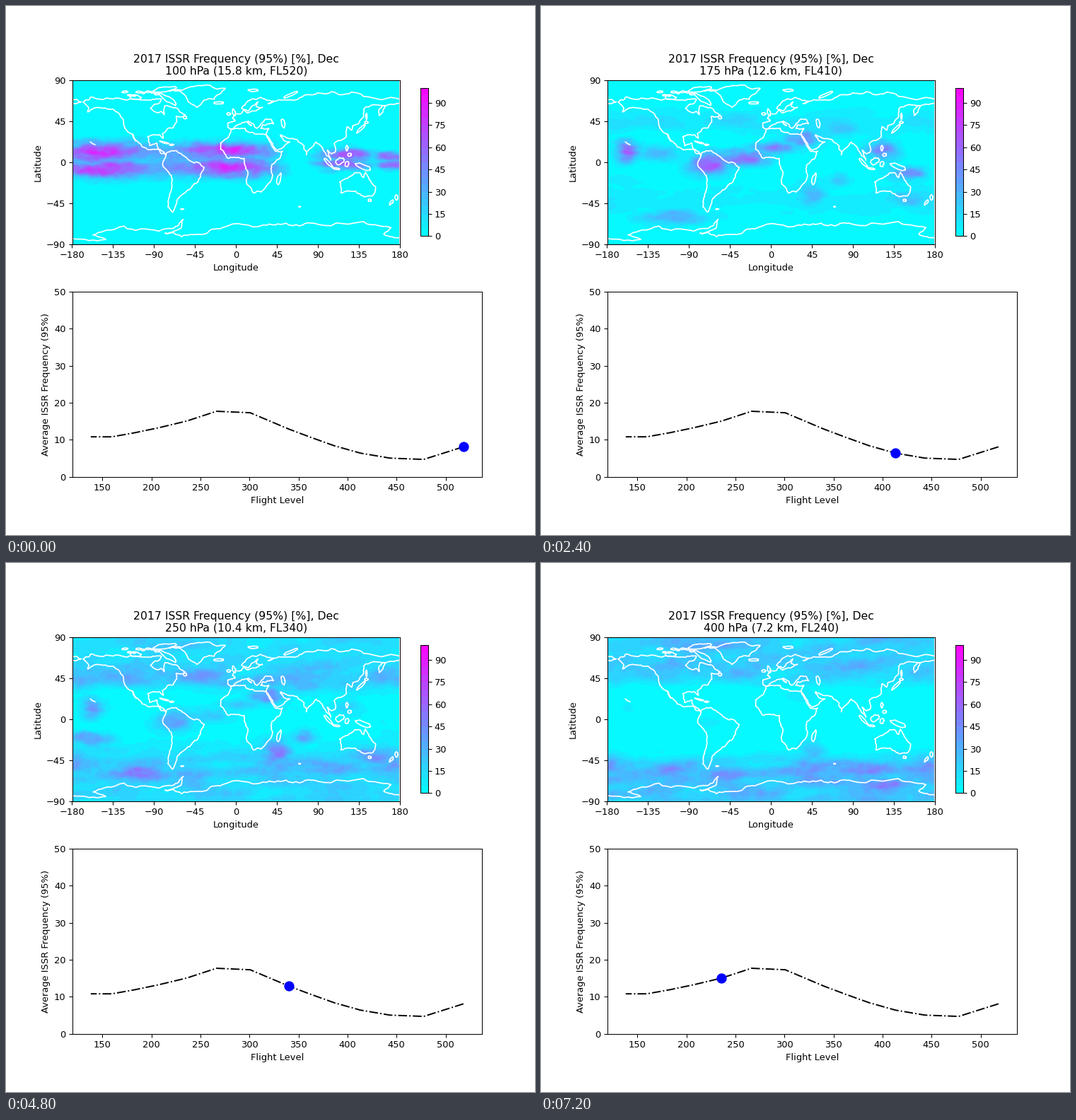
Recreate the animation shown at these times as a matplotlib script. Size 748 by 748 pixels, loop 8000 ms.

```python
import numpy as np
import matplotlib.pyplot as plt
from matplotlib.animation import FuncAnimation

rng = np.random.default_rng(17)
lons, lats = np.arange(-180, 180), np.arange(-90, 91)
LON, LAT = np.meshgrid(lons, lats)


def noise(sx, sy):
    """Smooth random field with unit spread and the given scale in degrees."""
    fx, fy = np.fft.fftfreq(lons.size), np.fft.fftfreq(lats.size)[:, None]
    low = np.exp(-2 * np.pi**2 * ((sx * fx) ** 2 + (sy * fy) ** 2))
    n = np.fft.ifft2(np.fft.fft2(rng.normal(size=LON.shape)) * low).real
    return n / n.std()


def bump(x, center, width, power=2):
    return np.exp(-np.abs((x - center) / width) ** power)


# Noise bends the coordinates so that formulas give ragged clouds.
X = LON + 2 * noise(8, 4) + noise(2.5, 1.5)
Y = LAT + 1.3 * noise(10, 4) + 0.7 * noise(3, 1.5)
TEXTURE = 1 + 0.08 * noise(3, 1.6) + 0.04 * noise(1.3, 0.9)
BROAD = 1 + 0.22 * noise(14, 4)

# Clouds: lon, lat, lon size, lat size, peak, depth of the peak, depth range
CLOUDS = [
    (-68, -2, 22, 11, 68, 0.45, 0.6), (-30, 3, 28, 8, 60, 0.45, 0.45),
    (-160, 12, 11, 10, 58, 0.55, 0.55), (-125, 9, 24, 8, 44, 0.4, 0.25),
    (5, 15, 24, 7, 46, 0.55, 0.4), (38, 26, 20, 8, 48, 0.75, 0.5),
    (76, 36, 20, 9, 42, 0.75, 0.25), (123, 13, 17, 11, 46, 0.5, 0.4),
    (150, -13, 20, 7, 46, 0.5, 0.25), (150, -41, 22, 9, 46, 0.8, 0.3),
    (43, -37, 14, 13, 50, 0.95, 0.5), (73, -20, 15, 8, 42, 0.8, 0.3),
    (-163, -22, 22, 7, 40, 0.95, 0.3), (-108, -61, 38, 8, 52, 0.85, 0.4),
    (-47, -70, 26, 11, 50, 1.1, 0.2), (130, -71, 22, 8, 58, 1.3, 0.2),
    (-78, 80, 30, 5, 50, 1.2, 0.2)]


def tropical_belt():
    """Two ragged bands beside the equator, broken near 68 E and 150 E."""
    half = np.where(X < 60, 9, 5)
    bands = bump(np.abs(Y - 2), half, half * 1.1)
    wave = 54 + 21 * np.cos(np.radians(2.5 * (X + 150)))
    gaps = (1 - bump(X, 68, 24)) * (1 - 0.75 * bump(X, 150, 14))
    return wave * bands * gaps


def humidity(pressure):
    depth = np.log(pressure / 100)
    rise = np.clip((depth - 0.65) / 0.5, 0, 1)
    jets = bump(Y, 44, 11) + 0.6 * bump(Y, -42, 13)
    polar = 21 / (1 + np.exp((42 - np.abs(Y)) / 4)) + 10 * bump(Y, -60, 12)
    base = (15 * jets * bump(depth, 0.85, 0.35) + polar * rise
            + 6 * bump(depth, 0.75, 0.22))
    parts = [base * BROAD, tropical_belt() * bump(depth, 0, 0.3)]
    for lon, lat, sx, sy, peak, level, reach in CLOUDS:
        parts.append(peak * bump(X, lon, sx) * bump(Y, lat, sy)
                     * bump(depth, level, reach))
    total = np.cbrt(sum(np.maximum(p, 0) ** 3 for p in parts))
    return np.clip(total * TEXTURE, 0, 99.9)


fig, (ax, bx) = plt.subplots(2, 1, figsize=(8, 8), dpi=93.5)
levels = np.arange(0, 101, 5)


def fill(pressure):
    return ax.contourf(lons, lats, humidity(pressure), levels, cmap="cool")


fig.colorbar(fill(100), ax=ax, shrink=0.8)
ax.set(xlim=(-180, 180), ylim=(-90, 90), aspect="equal",
       xticks=range(-180, 181, 45), yticks=range(-90, 91, 45),
       xlabel="Longitude", ylabel="Latitude")


def coast(*points):
    """Line through key points, roughened by midpoint displacement."""
    z = np.array([complex(*p) for p in points])
    for _ in range(3):
        step = np.diff(z)
        mid = z[:-1] + step / 2 + 0.09j * step * rng.normal(size=step.size)
        z = np.append(np.column_stack([z[:-1], mid]).ravel(), z[-1])
    ax.plot(z.real, z.imag, color="white", lw=1.3)


def island(lon, lat, rx, ry, tilt=0):
    """Tilted ellipse with an uneven shore."""
    a = np.linspace(0, 2 * np.pi, 13)[:-1]
    z = (rx * np.cos(a) + 1j * ry * np.sin(a)) * rng.uniform(0.75, 1.2, a.size)
    z = lon + 1j * lat + z * np.exp(1j * np.radians(tilt))
    z = np.append(z, z[0])
    ax.plot(z.real, z.imag, color="white", lw=1.3)


# North and South America, Greenland
coast((-77, 8), (-83, 10), (-87, 21), (-95, 18), (-97, 28), (-84, 30),
      (-80, 26), (-81, 31), (-76, 36), (-65, 44), (-66, 50), (-56, 52),
      (-65, 59), (-78, 62), (-79, 52), (-94, 59), (-82, 69), (-95, 68),
      (-128, 70), (-157, 71), (-168, 66), (-162, 60), (-163, 55), (-152, 60),
      (-135, 58), (-124, 47), (-122, 37), (-110, 23), (-114, 31), (-105, 20),
      (-92, 14), (-77, 8))
coast((-77, 8), (-72, 12), (-60, 9), (-50, 1), (-35, -6), (-39, -16),
      (-48, -26), (-58, -35), (-65, -42), (-68, -52), (-70, -55), (-75, -49),
      (-73, -38), (-70, -19), (-80, -5), (-80, 1), (-77, 8))
coast((-73, 78), (-46, 83), (-12, 81), (-20, 74), (-24, 69), (-43, 60),
      (-53, 67), (-58, 75), (-73, 78))

# Europe and Asia
coast((33, 30), (36, 37), (27, 37), (29, 41), (41, 42), (38, 47), (31, 46),
      (27, 41), (23, 37), (19, 42), (13, 45), (17, 40), (10, 44), (0, 40),
      (-5, 36), (-9, 38), (-9, 43), (-1, 45), (-4, 48), (5, 53), (9, 57),
      (12, 54), (21, 56), (29, 60), (22, 61), (24, 66), (17, 61), (13, 56),
      (6, 59), (13, 67), (27, 71), (41, 67), (35, 64), (44, 67), (68, 69),
      (73, 72), (85, 74), (104, 77), (113, 74), (140, 72), (180, 69))
coast((180, 65), (163, 60), (157, 51), (157, 58), (163, 62), (140, 58),
      (140, 50), (128, 40), (127, 35), (122, 39), (121, 28), (108, 21),
      (109, 12), (105, 9), (100, 13), (104, 2), (98, 10), (94, 17), (88, 22),
      (80, 14), (77, 8), (72, 20), (66, 25), (57, 26), (49, 30), (52, 24),
      (59, 22), (45, 13), (35, 28), (33, 30))
coast((-180, 69), (-170, 66), (-180, 65))

# Africa, Australia, Antarctica
coast((33, 31), (20, 31), (11, 34), (10, 37), (-6, 36), (-17, 21), (-17, 14),
      (-8, 4), (9, 4), (9, -2), (13, -12), (15, -27), (19, -34), (27, -33),
      (35, -24), (40, -15), (39, -6), (48, 4), (51, 12), (43, 12), (33, 30))
coast((114, -22), (115, -34), (131, -32), (140, -38), (150, -37), (153, -27),
      (146, -19), (142, -11), (140, -17), (136, -12), (130, -12), (122, -18),
      (114, -22))
coast((-180, -84), (-143, -85), (-157, -80), (-146, -76), (-110, -75),
      (-70, -73), (-58, -63), (-61, -73), (-78, -78), (-60, -82), (-35, -79),
      (-15, -72), (30, -69), (55, -67), (70, -70), (85, -67), (135, -66),
      (170, -72), (162, -79), (180, -84))

for shape in [
        (-78, 80, 12, 2.5, 8), (-75, 69, 11, 3, -30), (-111, 71, 6, 2.3),
        (-79, 21.5, 5, 0.6, -15), (-71, 19, 2.3, 0.8), (-56, 49, 2, 1.5),
        (-2.5, 54.5, 1.6, 4, 15), (-8, 53, 2, 1.5), (-19, 65, 5, 1.3),
        (19, 78.7, 6, 1.3), (60, 74, 8, 1.4, 25), (51.5, 42, 2, 5, 15),
        (47, -19, 2, 7, -15), (137, 36.5, 7, 1.2, 45), (143, 43.5, 2, 1.3),
        (143, 50, 0.7, 4), (121.5, 15.5, 1.2, 3), (124.5, 8, 2, 1.6),
        (114, 1, 4.5, 3.5, 40), (101, -0.5, 8, 1.4, -45),
        (110, -7.3, 4.5, 0.8, -8), (121.5, -2, 2, 3), (140, -5.5, 10, 2.5, -22),
        (146.5, -42, 1.8, 1.3), (176, -39, 1.5, 3), (170.5, -44, 1.2, 3.6, -35),
        (69.5, -49, 0.8, 0.4), (-59.5, -51.7, 1.5, 0.4)]:
    island(*shape)
for lon in range(-122, -84, 5):
    island(lon, rng.uniform(72.5, 77.5), rng.uniform(2, 4), 0.9)
coast((-160, 22), (-155, 19))

# Average over all levels
pressures = np.array([100, 125, 150, 175, 200, 225, 250,
                      300, 350, 400, 450, 500, 550, 600])
average = [8.1, 4.7, 5.05, 6.4, 8.4, 10.7, 12.9,
           17.3, 17.7, 15.05, 13.3, 11.9, 10.8, 10.8]
altitude = 44.3308 * (1 - (pressures / 1013.25) ** 0.190263)
flight_level = altitude / 0.03048

bx.plot(flight_level, average, "k-.")
dot, = bx.plot(flight_level[:1], average[:1], "o", color="blue", ms=10)
bx.set(ylim=(0, 50), xlabel="Flight Level",
       ylabel="Average ISSR Frequency (95%)")


def draw(i):
    for old in list(ax.collections):
        old.remove()
    fill(pressures[i])
    dot.set_data([flight_level[i]], [average[i]])
    ax.set_title(f"2017 ISSR Frequency (95%) [%], Dec\n{pressures[i]} hPa "
                 f"({altitude[i]:.1f} km, FL{round(flight_level[i], -1):.0f})")


anim = FuncAnimation(fig, draw, frames=10, interval=800, repeat=True,
                     repeat_delay=0, init_func=lambda: draw(0))
plt.show()
```
